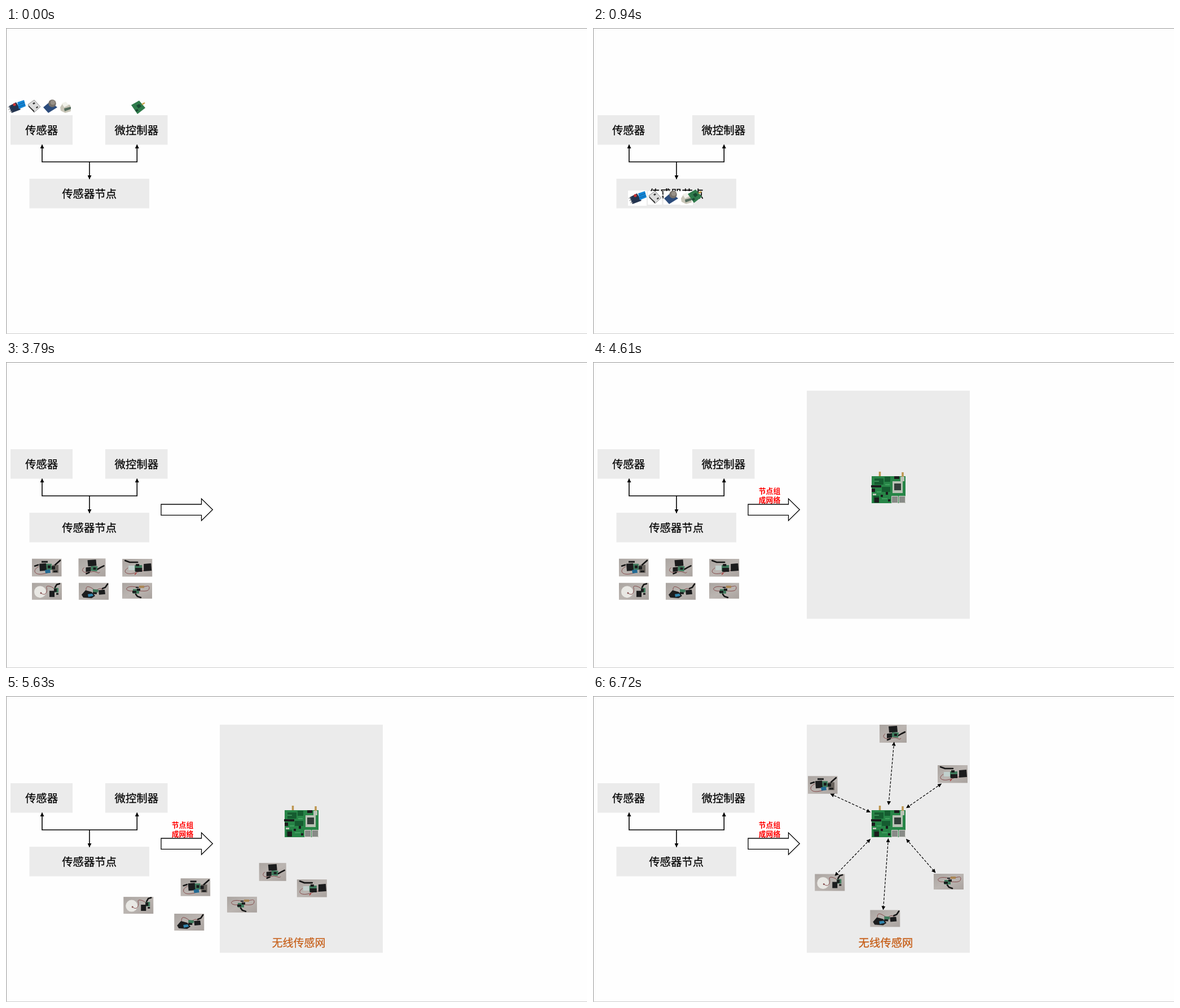
Animation, 1030 px wide and 544 px high, one loop 8 s. Source, as an HTML page:

```html
<!DOCTYPE html>
<html lang="zh-CN">
<head>
<meta charset="utf-8">
<title>无线传感网</title>
<style>
html, body { margin: 0; width: 100%; height: 100%; overflow: hidden; background: #fefefe; }
svg { display: block; }
text { font: 500 19.4px "Noto Sans CJK SC", "Noto Sans CJK", sans-serif; text-anchor: middle; stroke: currentColor; stroke-width: .25; }
.box { fill: #ebebeb; }
.line { fill: none; stroke: #000; stroke-width: 1.6; }
.dash { stroke-width: 1.2; stroke-dasharray: 4.5 2.5; }
.ant { fill: none; stroke: #151515; stroke-width: 2.6; stroke-linecap: round; }
.wire { fill: none; stroke: #7d3f40; stroke-width: .9; }
.dark { fill: #1b1c1d; }
.green { fill: #3f7a5c; }
.orange { fill: #c55a11; color: #c55a11; }
.red text { font-size: 12.8px; font-weight: 700; fill: #f00; stroke: none; }
</style>
</head>
<body>
<svg width="1030" height="544" viewBox="0 0 1030 544">
<defs>
  <marker id="tip" viewBox="0 0 7 7" markerWidth="7" markerHeight="7" refX="6.5" refY="3.5" orient="auto-start-reverse" markerUnits="userSpaceOnUse"><path d="M0 0L7 3.5L0 7z"/></marker>
  <linearGradient id="table" x2="1" y2="1"><stop stop-color="#aaa4a0"/><stop offset=".5" stop-color="#bbb5b1"/><stop offset="1" stop-color="#a9a29e"/></linearGradient>
</defs>
<path d="M.5 544V.5H1030" fill="none" stroke="#999"/>
<path d="M0 543.5H1030" stroke="#ccc"/>

<rect class="box" x="8" y="155" width="110" height="52.5"/>
<rect class="box" x="176" y="155" width="110.5" height="52.5"/>
<rect class="box" x="41.5" y="268" width="212.5" height="52.5"/>
<text x="63" y="189.4">传感器</text>
<text x="231.3" y="189.4">微控制器</text>
<text x="147.7" y="301.8">传感器节点</text>
<path class="line" d="M64 207.5V238H232.3V207.5" marker-start="url(#tip)" marker-end="url(#tip)"/>
<path class="line" d="M148 238V268.5" marker-end="url(#tip)"/>

<g id="sensors">
  <path fill="#fff" d="M2 127h33v27h-33zM37 128h25v24h-25zM65 128h30v24h-30zM95 128h22v25h-22z"/>
  <path fill="#24344f" d="M5 139L18 132L26 145L10 151z"/>
  <path fill="#1486d6" d="M20 132L32 128L35 139L23 144z"/>
  <path stroke="#0f5f9f" d="M22 136l11-4M23 140l11-4"/>
  <circle cx="15" cy="136" r="2.6" fill="#c33"/>
  <path stroke="#999" d="M3 141l5-1M4 145l5-1M6 149l5-1"/>
  <path fill="#ddd" stroke="#777" stroke-width=".8" d="M39 136L50 128L61 140L50 150z"/>
  <path fill="#333" d="M39 137L50 147L50 150L40 140zM47 134l3-2 2 2-3 2zM53 141l3-2 1 2-3 2z"/>
  <path fill="#2c4c7c" d="M66 141L78 131L91 141L75 151z"/>
  <circle cx="82" cy="134" r="6.8" fill="#77716a"/>
  <circle cx="83" cy="132.5" r="4" fill="#989188"/>
  <path fill="#c9c6b8" d="M96 141L101 133L114 137L115 148L105 151L97 147z"/>
  <path fill="#f1f1ea" d="M99 134L106 131L111 137L103 141z"/>
  <path fill="#546b5c" d="M103 143l12-3v4l-11 4z"/>
</g>
<g id="module">
  <path fill="#2f7b4b" d="M222 137L236 129L247 142L233 153z"/>
  <path fill="#194a31" d="M231 138l5-3 4 4-5 4zM229 146l4-2 2 3-4 2z"/>
  <path stroke="#c9a24a" stroke-width="2.5" d="M241 136l5-3"/>
</g>

<g id="flow">
  <path d="M275 253H346.5V243L366.3 262.5L346.5 282V272.3H275z" fill="#fff" stroke="#000" stroke-width="1.3"/>
</g>
<g id="panel">
  <rect class="box" x="379" y="51" width="289" height="405.5"/>
  <path fill="#278547" d="M494 203h60v48h-60z"/>
  <path fill="#155c30" d="M499 207h16v11h-16zM512 222h15v9h-15zM517 204h10v9h-10zM497 238h10v12h-10z"/>
  <path class="dark" d="M493 219h18v4h-18zM494 225h6v6h-6zM499 241h8v9h-8zM534 203h9v5h-9zM510 236h4v4h-4zM519 231h4v5h-4zM523 244h4v4h-4z"/>
  <path fill="#b9c2b5" d="M531 212h18v21h-18zM545 204h7v8h-7zM496 234h6v3h-6z"/>
  <path fill="#343f3b" d="M534 216h12v12h-12z"/>
  <path fill="#888b87" stroke="#d3d3cd" d="M529.5 238.5h11v12h-11zM542.5 238.5h11v12h-11z"/>
  <path stroke="#bd9650" stroke-width="3.5" d="M508.5 195v8M549 196v8"/>
  <path stroke="#5cb878" d="M499 212h8M518 218h8M512 243h10M503 231h8"/>
</g>
<g id="name" class="orange"><text y="445.8">无线传感网</text></g>
<g id="red" class="red"><text y="-3.2">节点组</text><text y="12.8">成网络</text></g>

<g class="node">
  <rect width="52.5" height="31.5" fill="url(#table)"/>
  <path class="wire" d="M12 14C0 20 4 30 20 27S28 22 32 24"/>
  <path class="green" d="M24 9h11v11h-11z"/>
  <path class="dark" d="M13 9l12-1 1 13-12 1zM17 4h11v3h-11zM28 12h5v5h-5z"/>
  <path fill="#226a93" d="M23 20l9-1 1 6-9 1z"/>
  <path fill="#69635d" d="M36 11h11v14h-11z"/>
  <path class="dark" d="M35 13h6v6h-6zM38 21h7v3h-7z"/>
  <path class="ant" d="M41 11L50 3M5 13l6-2"/>
</g>
<g class="node">
  <rect width="48" height="32" fill="url(#table)"/>
  <path class="wire" d="M10 16C2 23 12 27 22 24S35 29 38 24"/>
  <path class="green" d="M22 13l12 1-1 9-11-1z"/>
  <path class="dark" d="M16 3l15-1 1 11-15 1zM13 16l9-1v8l-9 1zM26 16h5v4h-5z"/>
  <path class="ant" d="M34 19L39 16L45 13"/>
  <path class="ant" stroke-width="1" d="M14 27l5-2"/>
</g>
<g class="node">
  <rect width="53" height="31.5" fill="url(#table)"/>
  <path class="wire" d="M10 16C-2 24 10 29 22 25S33 22 40 20"/>
  <path fill="#c1d0cd" d="M11 12h11v8h-11z"/>
  <path class="green" d="M22 11h13v11h-13z"/>
  <path class="dark" d="M38 9l13-1 1 13-14 1zM23 16h12v7h-12zM24 9h6v4h-6z"/>
  <path class="ant" d="M5 3L13 6L27 6"/>
  <path stroke="#a33" stroke-width="1.5" d="M22 28l3-3"/>
</g>
<g class="node">
  <rect width="53" height="30" fill="url(#table)"/>
  <circle cx="14.5" cy="16" r="10.5" fill="#e9e8e4"/>
  <path class="wire" d="M15 17C24 26 28 15 26 9S35 6 39 10"/>
  <circle cx="16" cy="18" r="1.5" fill="#855"/>
  <path class="green" d="M39 9h8v8h-8z"/>
  <path class="dark" d="M31 14h9v11h-9zM39 10h5v6h-5zM43 18h4v3h-4z"/>
  <path class="ant" d="M41 8L44 3L49 1.5"/>
</g>
<g class="node">
  <rect width="53" height="30" fill="url(#table)"/>
  <path class="wire" d="M13 13C12 2 22 8 27 12S37 5 43 13"/>
  <path class="dark" d="M5 21L12 13L23 16L29 23L23 27L8 26zM35 13l11-1 1 8-11 1zM25 16h7v4h-7z"/>
  <path class="green" d="M25 11l10 1-1 5-9-1z"/>
  <path fill="#3184ad" d="M16 20l8-1 2 4-9 2z"/>
  <path class="ant" d="M42 10L47 8L51 2"/>
</g>
<g class="node">
  <rect width="53" height="28" fill="url(#table)"/>
  <path class="wire" d="M22 14C2 17 4 4 22 7S48 1 48 9S34 14 27 14"/>
  <path class="green" d="M19 11h11v8h-11z"/>
  <path class="dark" d="M18 14h7v4h-7zM26 10h6v4h-6zM24 7h5v2h-5z"/>
  <path fill="#aa8551" d="M30 5h9v4h-9z"/>
  <path class="ant" d="M24 20L27 24L33 26"/>
</g>

<g id="links" class="line dash"></g>
</svg>
<script>
const LOOP = 8000;
const ticks = [0, 160, 300, 420, 550, 670, 820, 940, 1090, 1240, 1370, 1520, 1640, 1790, 3790, 3910, 4060, 4210, 4340,
  4490, 4610, 4730, 4850, 4970, 5110, 5230, 5360, 5510, 5630, 5750, 5870, 6000, 6120, 6270, 6420, 6580, 6720];
const $ = id => document.getElementById(id);
const clamp = v => Math.max(0, Math.min(1, v));
const show = (el, on) => el.style.display = on ? '' : 'none';
const pose = (el, x, y, more = '') => el.setAttribute('transform', `translate(${x} ${y}) ${more}`);

// cosine ease; a skew above 1 brings the fast part forward
function ease(t, start, span, skew = 1) {
  const p = 1 - (1 - clamp((t - start) / span)) ** skew;
  return (1 - Math.cos(Math.PI * p)) / 2;
}

const svgPath = d => {
  const path = document.createElementNS('http://www.w3.org/2000/svg', 'path');
  path.setAttribute('d', d);
  return path;
};

// start and end corner of each node; the upper row turns a rounded corner
const routes = [
  [46, 349.7, 381, 142.3], [128.5, 349.3, 508, 51], [206.2, 350, 611, 123],
  [46, 392.7, 393.3, 316.5], [129, 392.7, 491.3, 380.5], [206, 392.7, 604, 316]
];
const nodes = [...document.querySelectorAll('.node')].map((el, i) => {
  const [x, y, ex, ey] = routes[i], dx = ex - x, dy = ey - y, turns = i < 3;
  const bend = `h${dx / 2}c${dx * .224} 0 ${dx / 2} ${dy * .276} ${dx / 2} ${dy / 2}`;
  const path = svgPath(`M${x} ${y}${turns ? bend : ''}L${ex} ${ey}`);
  return { el, path, length: path.getTotalLength(), turns };
});

for (const d of ['M421 174L491.5 206.5', 'M533.7 82L524 193.5', 'M617.5 156L555.5 199',
  'M491.5 254.5L429 319.5', 'M523.5 253.5L514.5 380', 'M555.5 254.5L607 314']) {
  const link = svgPath(d);
  link.setAttribute('marker-start', 'url(#tip)');
  link.setAttribute('marker-end', 'url(#tip)');
  $('links').append(link);
}

const swoop = [[3910, 168, 83], [4060, 228, 190], [4210, 250, 192], [4340, 283, 196], [4490, 313, 237.5]];

function drawRed(t) {
  show($('red'), t >= 3910);
  const [, x, y] = swoop.findLast(s => s[0] <= t) || swoop[0];
  const left = 1 - clamp((t - 3910) / 580);
  pose($('red'), x, y, `rotate(${-90 * left}) scale(${1 + .3 * left})`);
}

function draw(now) {
  const t = ticks.findLast(v => v <= now % LOOP);

  const fall = ease(t, 0, 1640, 1.1);
  for (const [id, dx, dy] of [['sensors', 90, 243], ['module', -81, 237]]) {
    show($(id), t < 1790);
    pose($(id), dx * fall, dy * fall);
  }

  show($('flow'), t >= 3790);
  drawRed(t);
  show($('panel'), t >= 4490);

  const swivel = clamp((t - 4680) / 975);
  pose($('name'), 519, 0, `scale(${Math.sin(2.5 * Math.PI * swivel)} 1)`);
  $('name').style.opacity = swivel;

  for (const { el, path, length, turns } of nodes) {
    show(el, t >= 1790);
    const s = turns ? ease(t, 4850, 1750, 1.3) : ease(t, 4850, 1628);
    const { x, y } = path.getPointAtLength(s * length);
    pose(el, x, y);
  }
  show($('links'), t >= 6720);
}

const begin = performance.now();
function frame() {
  draw(performance.now() - begin);
  requestAnimationFrame(frame);
}
frame();
</script>
</body>
</html>
```
